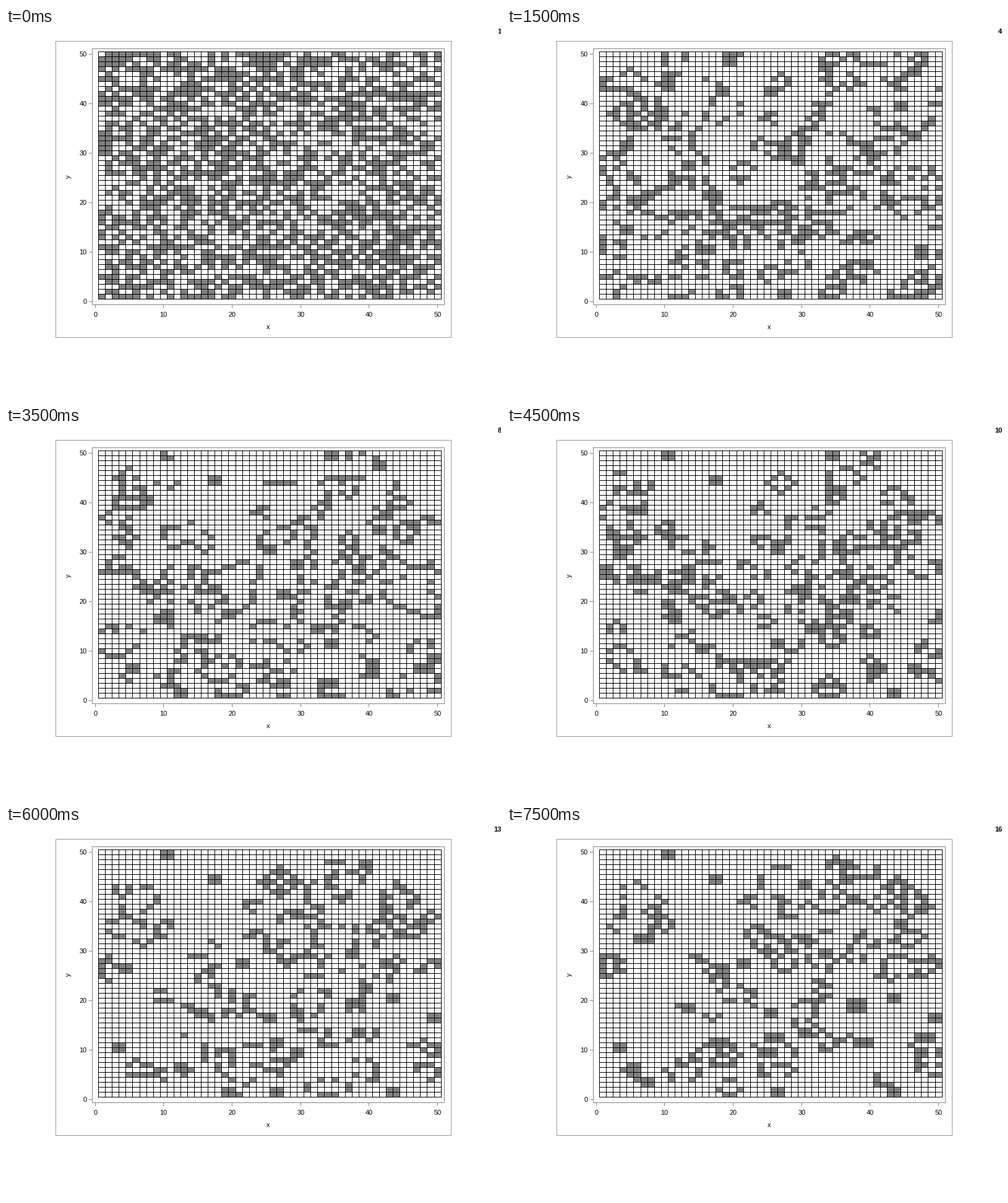
A matplotlib script for the animation above (8000 ms loop, 800x600 px).

```python
import matplotlib.pyplot as plt
import numpy as np
from matplotlib.animation import FuncAnimation
from matplotlib.patches import Rectangle

W, H, DPI = 800, 600, 100
PX = 72 / DPI              # one pixel in points
N, STEPS = 50, 16
X0, DX = 144.1, 11.07      # pixel of x = 0, pixels per unit
Y0, DY = 442, 8
FRAME, AXIS = "#989898", "#868686"

plt.rcParams["font.family"] = "Liberation Sans"


def evolve(grid):
    """One Game of Life step on a board with dead borders."""
    p = np.pad(grid.astype(int), 1)
    near = sum(p[1 + i:N + 1 + i, 1 + j:N + 1 + j]
               for i in (-1, 0, 1) for j in (-1, 0, 1)) - grid
    return (near == 3) | (grid & (near == 2))


def history(seed):
    grid = np.random.default_rng(seed).random((N, N)) < 0.5
    boards = [grid]
    for _ in range(STEPS - 1):
        boards.append(evolve(boards[-1]))
    return boards


boards = history(12)

fig = plt.figure(figsize=(W / DPI, H / DPI), dpi=DPI, facecolor="white")
ax = fig.add_axes([0, 0, 1, 1])
ax.set_xlim(0, W)
ax.set_ylim(H, 0)
ax.axis("off")


def box(x0, y0, x1, y1, color):
    ax.add_patch(Rectangle((x0 + .5, y0 + .5), x1 - x0, y1 - y0, fill=False,
                           ec=color, lw=PX, snap=False))


def label(x, y, s, size=11, **kw):
    return ax.text(x, y, s, fontsize=size * PX, color="black", **kw)


def vlines(xs, top, bottom, color):
    ax.vlines(np.array(xs) + .5, top, bottom, color=color, lw=PX, zorder=3).set_snap(False)


def hlines(ys, left, right, color):
    ax.hlines(np.array(ys) + .5, left, right, color=color, lw=PX, zorder=3).set_snap(False)


box(80, 21, 719, 500, FRAME)
box(139, 33, 708, 447, AXIS)

# Cells and their outlines
xs = np.floor(X0 + DX * (np.arange(N + 1) + .5))
ys = Y0 - DY * (np.arange(N + 1) + .5)
cells = ax.pcolormesh(xs + .5, ys + .5, boards[0].astype(float), cmap="gray_r",
                      vmin=0, vmax=255 / 127, antialiased=False)
vlines(xs, ys[-1], ys[0] + 1, "black")
hlines(ys, xs[0], xs[-1] + 1, "black")

# Axes
ticks = np.arange(0, N + 1, 10)
tx = np.floor(X0 + DX * ticks)
ty = Y0 - DY * ticks
vlines(tx, 448, 453, AXIS)
hlines(ty, 134, 139, AXIS)
for t, x, y in zip(ticks, tx, ty):
    label(x + .5, 467, t, ha="center", va="baseline")
    label(130.5, y + 4.5, t, ha="right", va="baseline")
label(424, 487, "x", ha="center", va="baseline")
label(100.5, 240, "y", ha="center", va="center", rotation=90)

counter = label(800.5, 9, "1", ha="right", va="baseline", weight="bold")


def draw(i):
    cells.set_array(boards[i].astype(float))
    counter.set_text(str(i + 1))
    return cells, counter


anim = FuncAnimation(fig, draw, frames=STEPS, init_func=lambda: draw(0),
                     interval=500, repeat=True, repeat_delay=0, blit=False)
plt.show()
```
